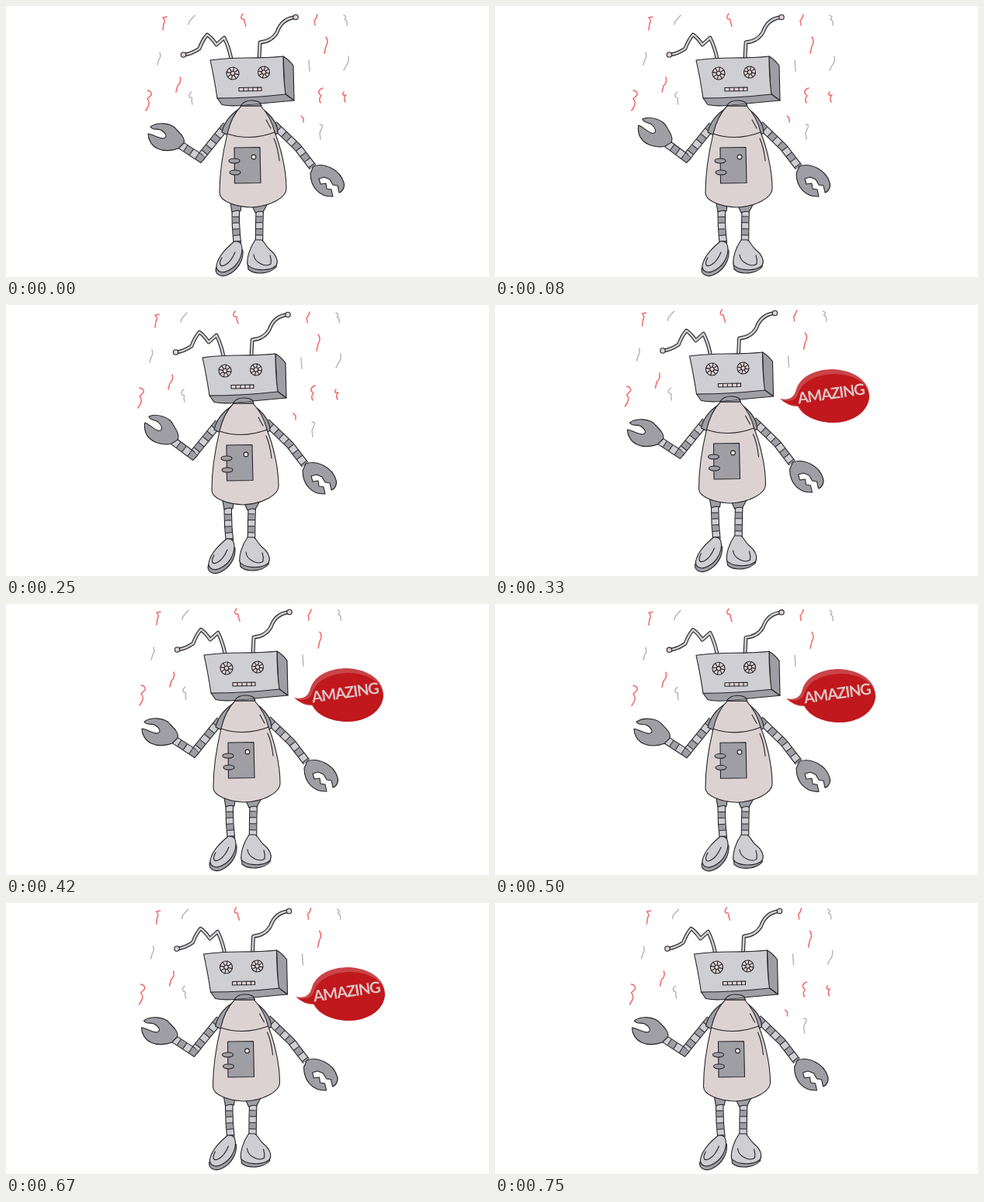
Write an HTML page that moves like this. It is 622 px wide and 350 px high and loops after 830 ms.

```html
<!DOCTYPE html>
<html lang="en">
<head>
<meta charset="utf-8">
<title>Amazing robot</title>
<style>
  html, body { margin: 0; width: 100%; height: 100%; overflow: hidden; background: #fff; }
  svg { display: block; width: 100vw; height: 100vh; }
  .ink { stroke: #252327; stroke-width: 1.1; stroke-linejoin: round; stroke-linecap: round; }
  .none { fill: none; }
  .light { fill: #cfced3; }
  .dark { fill: #9f9ea5; }
  .pink { fill: #ddd2d2; }
  .bits path { fill: none; stroke-width: 1.5; stroke-linecap: round; stroke-linejoin: round; }
  .red { stroke: #f0686a; }
  .gray { stroke: #b7b7b9; }
  text { font: 700 20px Lato, "Open Sans", sans-serif; letter-spacing: -1.2px; fill: #dfc6c7; text-anchor: middle; }
</style>
</head>
<body>
<svg viewBox="0 0 622 350">
  <g id="scene">
    <g class="bits">
      <path class="red" d="M207 14L202 15Q206 19 203 23L202 31M305 10Q301 15 304 17Q308 16 307 20L309 26M401 11Q400 16 397 19Q398 21 398 25M412 40Q416 46 412 52L410 61M224 92Q226 99 221 103L219 111M182 109Q188 110 187 115L182 120Q186 124 183 130L180 135"/>
      <path class="gray" d="M243 12L236 20L235 24M435 12Q440 14 436 17Q440 19 439 25M198 60Q200 66 197 69L195 76M390 70L391 84M239 111Q234 115 237 118Q241 118 239 122L240 127"/>
    </g>
    <g class="bits" id="extra">
      <path class="red" d="M408 106Q402 108 403 113L406 116Q402 120 405 125M435 111Q431 116 438 115Q434 119 437 124M380 142L383 145L383 150"/>
      <path class="gray" d="M441 65Q442 73 438 77L435 83M404 153Q410 153 406 159L404 164L405 172"/>
    </g>

    <g id="antennae"></g>
    <g class="ink">
      <circle class="pink" cx="228.500" cy="63" r="3.200"/>
      <circle class="pink" cx="373" cy="14.500" r="3.200"/>
    </g>

    <g id="limbs"></g>
    <g class="ink">
      <path class="dark" d="M396 207C410 202 430 211 435 228C437 234 433 240 429 241L427 232L421 231L417 224L410 221L403 223L405 230L412 229L413 236L419 237L421 246C404 247 392 234 392 216Z"/>
      <path class="dark" d="M289 255L291 266Q297 263 302 265L303 258ZM317 258L321 267Q327 264 331 266L337 255Z"/>
    </g>
    <g id="forearm">
      <g id="claw">
        <path class="ink dark" d="M186 156C194 150 212 150 219 159C225 165 231 171 229 177L222 184C214 187 203 188 195 184C187 180 183 172 183 165C190 166 196 171 203 171C209 169 205 163 199 160C194 158 189 161 186 156Z"/>
      </g>
    </g>

    <g class="ink">
      <path class="dark" d="M297 305C289 312 275 324 270 340C270 349 280 350 286 347C297 342 306 330 305 316Z"/>
      <path class="light" d="M294 304C287 310 274 321 271 335C270 343 278 345 283 343C295 339 303 328 304 315C304 308 302 303 294 304Z"/>
      <path class="none" d="M278 325C273 334 276 338 283 334Q290 330 295 318"/>
      <path class="dark" d="M311 331L312 340C321 348 340 346 348 337L349 328Z"/>
      <path class="light" d="M321 302C314 312 310 325 311 334C317 342 338 343 347 336C352 331 348 321 340 315C334 310 333 304 329 302Z"/>
      <path class="none" d="M319 321C320 332 335 338 341 333Q342 328 340 322"/>
    </g>

    <g class="ink">
      <path class="dark" d="M300 133Q282 145 278 163L286 167ZM333 135Q350 149 350 164L345 167Z"/>
      <path class="pink" d="M303 129C293 139 288 152 285 165C279 190 275 220 275 241C275 252 295 259 315 260C341 259 361 247 361 236C361 210 353 180 346 163C343 150 338 140 328 129Z"/>
      <path class="none" d="M285 165Q315 175 346 163M335 147L341 158M345 171Q350 182 352 200"/>
      <path class="dark" d="M294 183L327 182.500L328 228.500L294.500 229Z"/>
      <circle fill="#f1e9e9" cx="319" cy="195" r="2.900"/>
      <ellipse class="dark" cx="294" cy="200" rx="7" ry="3"/>
      <ellipse class="dark" cx="295" cy="215" rx="7" ry="3"/>
      <path class="dark" d="M303 129Q306 122 316 122Q327 122 329 129Z"/>
      <path class="dark" d="M272 119L278 127.500Q290 130 306 128L371 122L359 113Z"/>
      <path class="dark" d="M303 128Q307 122 316 122Q325 122 328 126"/>
      <path class="dark" d="M357 65Q364 69 370 77L371 122L359 113Z"/>
      <path class="light" d="M263 70Q285 67 310 67Q340 67 357 65Q357 92 360 114Q315 119 272 119Q268 92 263 70Z"/>
    </g>
    <g id="face" class="ink"></g>
  </g>

  <g id="bubble">
    <path fill="#c94448" d="M367 121Q384 125 388 109C394 91 414 83 435 83C462 84 482 98 482 117C481 139 460 152 434 152C413 151 397 144 390 131Q377 131 367 121Z"/>
    <path fill="#c0181c" d="M370 123Q386 126 390 116C395 98 414 90 437 89C462 89 481 101 482 119C480 139 460 152 434 152C413 151 397 143 391 130Q379 130 370 123Z"/>
    <text transform="translate(433.500 121.500) rotate(-8)">AMAZING</text>
  </g>
</svg>

<script>
const LOOP = 830;
const $ = id => document.getElementById(id);

function add(parent, tag, attrs, first = null) {
  const el = document.createElementNS("http://www.w3.org/2000/svg", tag);
  for (const key in attrs) el.setAttribute(key, attrs[key]);
  parent.insertBefore(el, first);
}

// An outlined pipe, optionally banded, placed behind the other parts of its group.
function pipe(parent, d, width, band) {
  const first = parent.querySelector("#claw");
  const layer = (stroke, w, dash = "none", shift = 0) => add(parent, "path", {
    d, fill: "none", stroke, "stroke-width": w, "stroke-linejoin": band ? "miter" : "round",
    "stroke-dasharray": dash, "stroke-dashoffset": shift
  }, first);
  layer("#252327", width);
  layer("#cfced3", width - 2.2);
  if (!band) return;
  layer("#252327", width - 2, `${band + 1} ${band - 1}`, 0.5);
  layer("#9f9ea5", width - 2.2, `${band - 1} ${band + 1}`, -0.5);
}

pipe($("antennae"), "M290 68Q287 53 281 41L271 50Q265 41 259 37Q253 44 249 55Q239 62 229 63", 4.8);
pipe($("antennae"), "M326 68L327 47Q342 46 349 34Q355 16 373 14.5", 4.8);
pipe($("limbs"), "M284 154L250 196", 11, 9);
pipe($("limbs"), "M345 153L376 183L395 208", 10.5, 9);
pipe($("limbs"), "M296 256Q295 283 298 307", 10.5, 8);
pipe($("limbs"), "M327 256Q326 280 326 305", 10.5, 8);
pipe($("forearm"), "M253 192.5L250 196L224 179", 11, 9);

function eye(x, y, r) {
  const face = $("face");
  add(face, "circle", { cx: x, cy: y, r, class: "pink" });
  let spokes = "";
  for (let i = 0; i < 8; i++) {
    const c = Math.cos(i * Math.PI / 4 + 0.2), s = Math.sin(i * Math.PI / 4 + 0.2);
    spokes += `M${x + c * 3} ${y + s * 3}L${x + c * r} ${y + s * r}`;
  }
  add(face, "path", { d: spokes, class: "none" });
  add(face, "circle", { cx: x, cy: y, r: 2.7, class: "pink" });
}
eye(292, 87, 8);
eye(332, 85.5, 7.5);
add($("face"), "path", {
  class: "pink",
  d: "M300 105.5L329 105V109.5L300 110ZM306 105.5V110M312 105.5V110M318 105V110M324 105V110"
});

// start, scene x, scene y, claw lift, bubble x, bubble y (absent: no bubble)
const steps = [
  [0, 0, 0, 0],
  [80, -4, 0, 0.5],
  [170, -8, -0.5, 1],
  [250, -10, -2, 0.5],
  [330, -12.5, -4, 0, 0, 0],
  [420, -8, -4, 0, 4, 0],
  [500, -4, -3.7, 0, 8, 1],
  [580, -15, -4.8, 0, -1, -0.5],
  [670, -8.5, -4, 0, 6, 0],
  [750, -6.5, -4, 0]
];

function draw() {
  const t = performance.now() % LOOP;
  const [, x, y, lift, bx, by] = steps.findLast(s => s[0] <= t);
  const talking = bx !== undefined;
  $("scene").setAttribute("transform", `translate(${x} ${y})`);
  $("forearm").setAttribute("transform", `rotate(${lift * 7} 250 198)`);
  $("claw").setAttribute("transform", `rotate(${lift * 20} 226 180)`);
  $("bubble").setAttribute("visibility", talking ? "visible" : "hidden");
  $("extra").setAttribute("visibility", talking ? "hidden" : "visible");
  if (talking) $("bubble").setAttribute("transform", `translate(${bx} ${by})`);
  requestAnimationFrame(draw);
}
draw();
</script>
</body>
</html>
```
